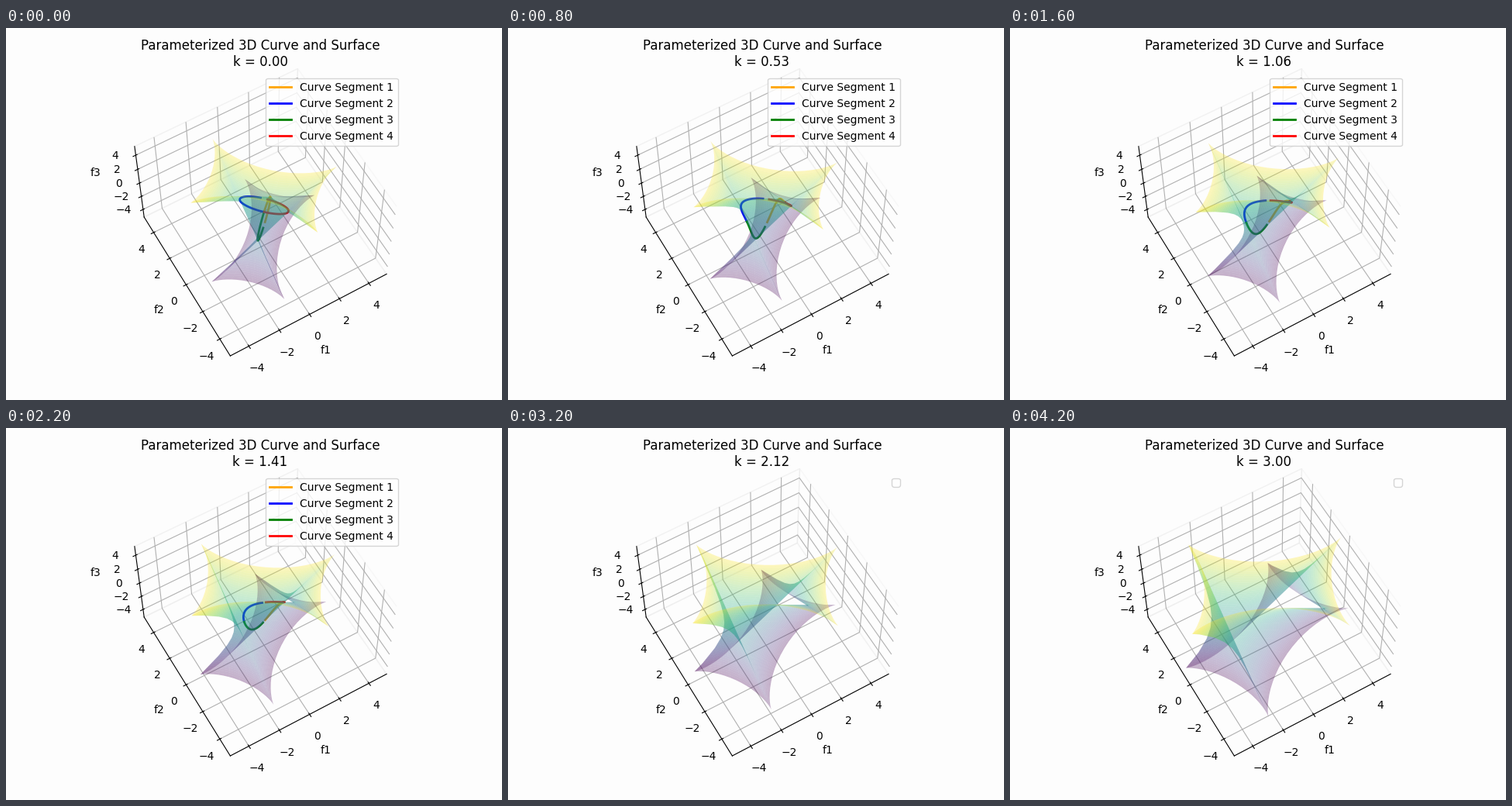
Animation of 640x480 px, one loop 4.4 s. Source, as a matplotlib script:

```python
import matplotlib.pyplot as plt
import numpy as np
from matplotlib.animation import FuncAnimation
from matplotlib.lines import Line2D

BACK = "#fdfdfd"
LIMIT = 5 * 25 / 24
HEIGHT = 4
COLORS = ["orange", "blue", "green", "red"]
# sign of f1 and of f3 on each curve segment
SIGNS = [(1, -1), (-1, 1), (-1, -1), (1, 1)]

# even steps plus the values where the shape changes type
K_VALUES = np.sort(np.append(np.linspace(0, 3, 18), [1 / 3, 2 / 3, 4 / 3, 2]))

THETA, F3 = np.meshgrid(np.linspace(0, 2 * np.pi, 100),
                        np.linspace(-HEIGHT, HEIGHT, 100))


def surface(k):
    """Points where 1 + k/2 cos 2t + f1 cos t + f2 sin t - f3/2 sin 2t
    has a double root t."""
    c2, s2 = np.cos(2 * THETA), np.sin(2 * THETA)
    value = -1 - k / 2 * c2 + F3 / 2 * s2
    slope = k * s2 + F3 * c2
    f1 = value * np.cos(THETA) - slope * np.sin(THETA)
    f2 = value * np.sin(THETA) + slope * np.cos(THETA)
    return f1, f2, F3


def segment(k, side, up):
    """One quarter of the curve of two double roots."""
    a = np.linspace(0, np.pi / 2 - 0.07, 120)
    r = np.sqrt(max(0, 1 - k / 2))
    q, v = r * np.cos(a), r * np.sin(a)
    u = np.sqrt(k + v ** 2)
    return side * 2 * q * u, -side * up * 2 * q * v, up * 2 * u * v


fig = plt.figure(figsize=(6.4, 4.8), dpi=100, facecolor=BACK)
ax = fig.add_subplot(projection="3d", facecolor=BACK)
ax.view_init(elev=60, azim=-120)
for name, axis in zip(("f1", "f2", "f3"), (ax.xaxis, ax.yaxis, ax.zaxis)):
    axis.set_label_text(name)
    axis.pane.fill = False
handles = [Line2D([], [], color=color, lw=2, label=f"Curve Segment {i}")
           for i, color in enumerate(COLORS, 1)]
shapes = []


def update(frame):
    k = K_VALUES[frame]
    while shapes:
        shapes.pop().remove()
    has_curve = k <= 2
    if has_curve:
        for color, signs in zip(COLORS, SIGNS):
            shapes.extend(ax.plot(*segment(k, *signs), color=color, lw=2))
    shapes.append(ax.plot_surface(*surface(k), cmap="viridis", alpha=0.3,
                                  edgecolor="none"))
    ax.legend(handles=handles if has_curve else [], loc="upper right")
    ax.set(xlim=(-LIMIT, LIMIT), ylim=(-LIMIT, LIMIT), zlim=(-LIMIT, LIMIT))
    ax.set_title(f"Parameterized 3D Curve and Surface\nk = {k:.2f}")
    return shapes


anim = FuncAnimation(fig, update, frames=len(K_VALUES), interval=200,
                     repeat=True, repeat_delay=0)
plt.show()
```
